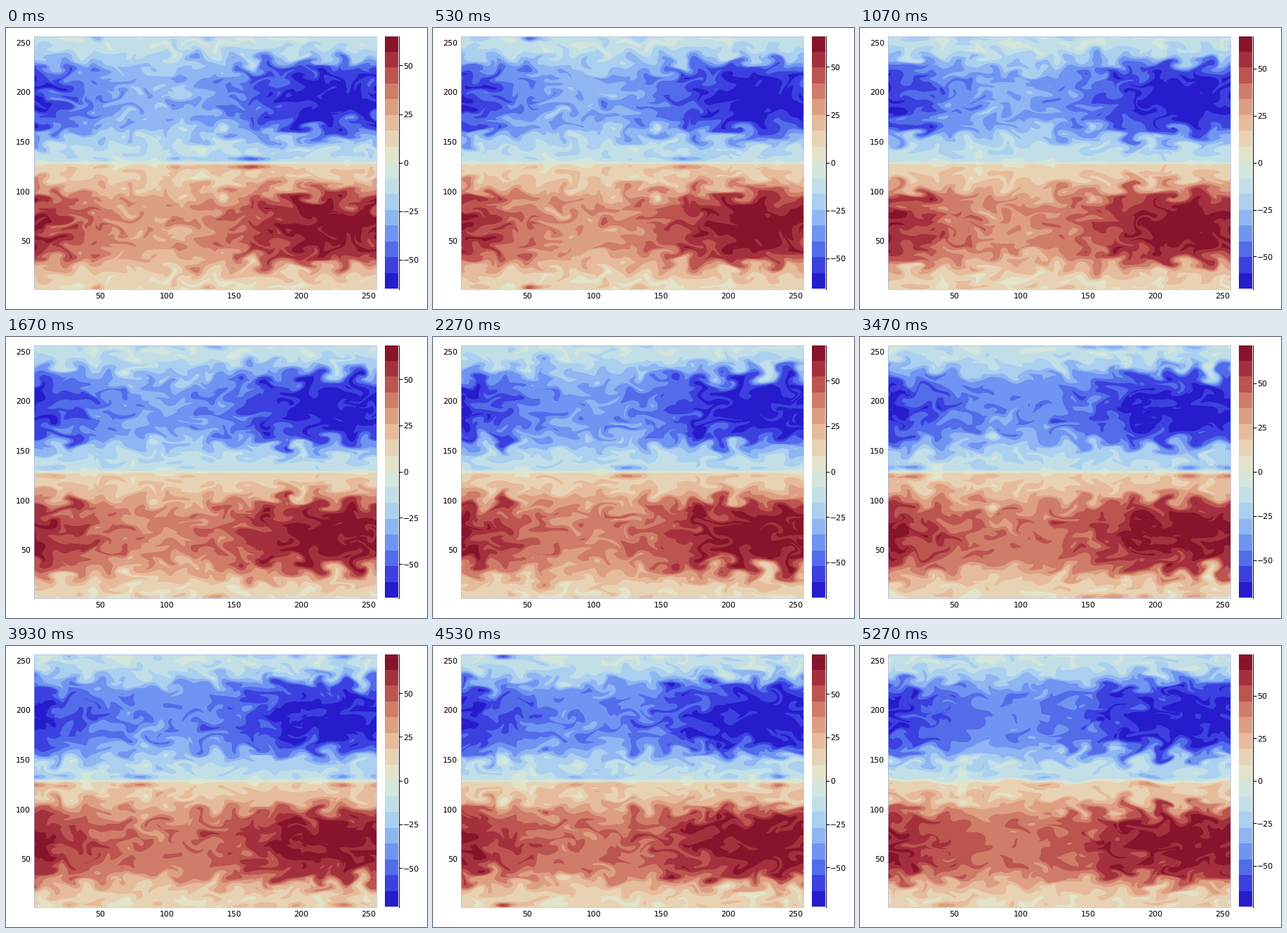
A matplotlib script for the animation above (5340 ms loop, 600 by 400 pixels).

```python
import matplotlib.pyplot as plt
import numpy as np
from matplotlib.animation import FuncAnimation

FRAMES, LOOP = 80, 5340
W, H, DPI = 600, 400, 100
N, HALF = 256, 128
PLOT_W, PLOT_H = 488, 360
PX = 72 / DPI  # points per pixel

PALETTE = """261ccc 3b40df 526cea 7094f1 8fb5f2 abcfef c2dfe7 d3e6db
             e2e3c9 e8d2b4 e5bb9b dd9f82 cf7c69 bc5450 a3303c 87142a""".split()
COLORS = np.array([[int(c[i:i + 2], 16) for i in (0, 2, 4)] for c in PALETTE],
                  np.float32) / 255

# The value range grows through these points
TIMES = [0, 16, 34, 45, 59, 68, 79]
LIMITS = [65, 67.2, 69.5, 70.4, 72.3, 72.8, 74.4]

VORTICES, DRIFT, LIFE = 170, 0.6, 6

rng = np.random.default_rng(11)
cols, rows = np.arange(N), np.arange(HALF)
xx, yy = np.meshgrid(cols.astype(float), rows.astype(float))
kx = 2 * np.pi * np.fft.fftfreq(N)[None, :]
ky = 2 * np.pi * np.fft.fftfreq(HALF)[:, None]


def make_noise(lx, ly):
    """Smooth drifting noise with unit variance, as a function of time."""
    k2 = (kx * lx) ** 2 + (ky * ly) ** 2
    shape = (HALF, N)
    coef = k2 * np.exp(-k2) * (rng.normal(size=shape) + 1j * rng.normal(size=shape))
    omega = rng.normal(0, 0.07, shape) - 0.5 * kx

    def at(t):
        field = np.fft.ifft2(coef * np.exp(1j * omega * t)).real
        return field / field.std()
    return at


def make_vortex():
    """Peak time, centre, radii and strength of one short-lived vortex."""
    t0, x = rng.uniform(-LIFE, FRAMES + LIFE), rng.uniform(0, N)
    kind = rng.choice(["wall", "flank", "core"], p=[0.2, 0.5, 0.3])
    if kind == "wall":
        return (t0, x, rng.choice([3.5, HALF - 3]), rng.uniform(3.5, 9), 2,
                rng.uniform(0.1, 0.4))
    sign = rng.choice([-1, 1], p=[0.65, 0.35])
    if kind == "flank":
        return (t0, x, rng.choice([32, 101]) + rng.normal(0, 7),
                rng.uniform(3, 6), rng.uniform(2, 4), sign * rng.uniform(0.1, 0.3))
    return (t0, x, rng.normal(64, 15), rng.uniform(3, 6), rng.uniform(2, 3.5),
            sign * rng.uniform(0.05, 0.15))


stream = make_noise(5, 4)
ripple = make_noise(4.5, 2.6)
vortices = [make_vortex() for _ in range(VORTICES)]
calm_walls = np.tanh(yy / 10) * np.tanh((HALF - 1 - yy) / 8)
stir = calm_walls * (0.8 + 0.2 * np.cos(2 * np.pi * (xx - 222) / N))


def sample(field, x, y):
    """Bilinear lookup, periodic in x and clamped in y."""
    y = np.clip(y, 0, field.shape[0] - 1.001)
    x = x % N
    i, j = y.astype(int), x.astype(int)
    fy, fx = y - i, x - j
    j %= N
    k = (j + 1) % N
    low = field[i, j] * (1 - fx) + field[i, k] * fx
    high = field[i + 1, j] * (1 - fx) + field[i + 1, k] * fx
    return low * (1 - fy) + high * fy


def jet(x, y, t):
    strong, weak = 0.95, 0.43 + 0.17 * (t / FRAMES) ** 0.6
    peak = (strong + weak) / 2 + (strong - weak) / 2 * np.cos(
        2 * np.pi * (x - 222) / N)
    core = 0.5 * (np.tanh((y - 26) / 13) - np.tanh((y - 102) / 13))
    edge = 0.18 - 0.05 * (y / HALF) ** 2
    return edge + (peak - edge) * core


def stirred(t, path=6.5, steps=4):
    """Where each grid point came from, traced back along the eddies."""
    dy, dx = np.gradient(stream(t) * stir)
    scale = path / steps / np.sqrt((dx ** 2 + dy ** 2).mean())
    u, v = -dy * scale, dx * scale
    x, y = xx - u, yy - v
    for _ in range(steps - 1):
        x, y = x - sample(u, x, y), y - sample(v, x, y)
    return x, y


def strength(t):
    """Speed in one half of the basin, as a fraction of the range."""
    x, y = stirred(t)
    m = jet(x, y, t) + 0.05 * sample(ripple(t), x, y)
    m *= 1 - np.exp(-(yy + 0.5) / 1.2)
    for t0, cx, cy, wide, tall, amp in vortices:
        fade = np.exp(-0.5 * ((t - t0) / LIFE) ** 2)
        if fade > 0.05:
            dx = (cols - cx - DRIFT * (t - t0) + HALF) % N - HALF
            m += amp * fade * np.outer(np.exp(-0.5 * ((rows - cy) / tall) ** 2),
                                       np.exp(-0.5 * (dx / wide) ** 2))
    return m


full_x, full_y = np.meshgrid(np.arange(N, dtype=float), np.arange(N, dtype=float))
wave = 2 * np.pi * full_x / N
bend = 1.5 * np.sin(3 * wave + 1.2) + 1.2 * np.sin(8 * wave - 4)
bend *= np.exp(-((full_y - HALF) / 25) ** 2)


def basin(t):
    m = strength(t)
    field = np.vstack([m[::-1], -m])
    tilt = np.clip((t - 68) / 11, 0, 1)  # the mirror symmetry breaks late
    if tilt > 0:
        field = sample(field, full_x, full_y - tilt * bend)
    return field


def stretch(size):
    """Linear interpolation matrix from N grid points to size pixels."""
    pos = (np.arange(size) + 0.5) / size * (N - 1)
    return np.maximum(0, 1 - np.abs(pos[:, None] - np.arange(N))).astype(np.float32)


to_rows, to_cols = stretch(2 * PLOT_H), stretch(2 * PLOT_W).T


def bands(field):
    """Filled contour bands, smoothed by averaging 2 x 2 samples."""
    fine = to_rows @ field.astype(np.float32) @ to_cols
    idx = np.clip(np.floor((fine + 1) * 8), 0, 15).astype(np.uint8)
    return sum(COLORS[idx[a::2, b::2]] for a in (0, 1) for b in (0, 1)) / 4


def add_axes(x, y, w, h):
    return fig.add_axes([x / W, 1 - (y + h) / H, w / W, h / H])


plt.rcParams.update({"font.family": "DejaVu Sans", "font.size": 11 * PX,
                     "text.hinting": "no_hinting"})
fig = plt.figure(figsize=(W / DPI, H / DPI), dpi=DPI, facecolor="white")

ax = add_axes(40, 12, PLOT_W, PLOT_H)
image = ax.imshow(np.ones((PLOT_H, PLOT_W, 3)), origin="lower", aspect="auto",
                  extent=(1, N, 1, N), interpolation="nearest")
ax.set_xticks(range(50, 251, 50))
ax.set_yticks(range(50, 251, 50))
ax.tick_params(axis="x", length=0, pad=4.6 * PX)
ax.tick_params(axis="y", length=0, pad=5 * PX)
for spine in ax.spines.values():
    spine.set(color="#9fb0ea", linewidth=0.6 * PX)

bar = add_axes(540, 12, 19, 359.5)
ramp = bar.imshow(COLORS[:, None, :], origin="lower", aspect="auto",
                  extent=(0, 1, -65, 65), interpolation="nearest")
bar.set_xticks([])
bar.set_yticks(range(-50, 51, 25))
bar.yaxis.tick_right()
for side in ("left", "top", "bottom"):
    bar.spines[side].set_visible(False)
bar.spines["right"].set_linewidth(PX)
bar.spines["right"].set_position(("outward", 0.5 * PX))
bar.tick_params(axis="y", length=5 * PX, width=PX, pad=1.5 * PX, right=True,
                labelright=True, left=False, labelleft=False)


def update(t):
    limit = np.interp(t, TIMES, LIMITS)
    image.set_data(bands(basin(t)))
    ramp.set_extent((0, 1, -limit, limit))
    bar.set_ylim(-limit, limit)
    return image, ramp


anim = FuncAnimation(fig, update, frames=FRAMES, interval=LOOP / FRAMES,
                     repeat=True, repeat_delay=0, blit=False)
plt.show()
```
